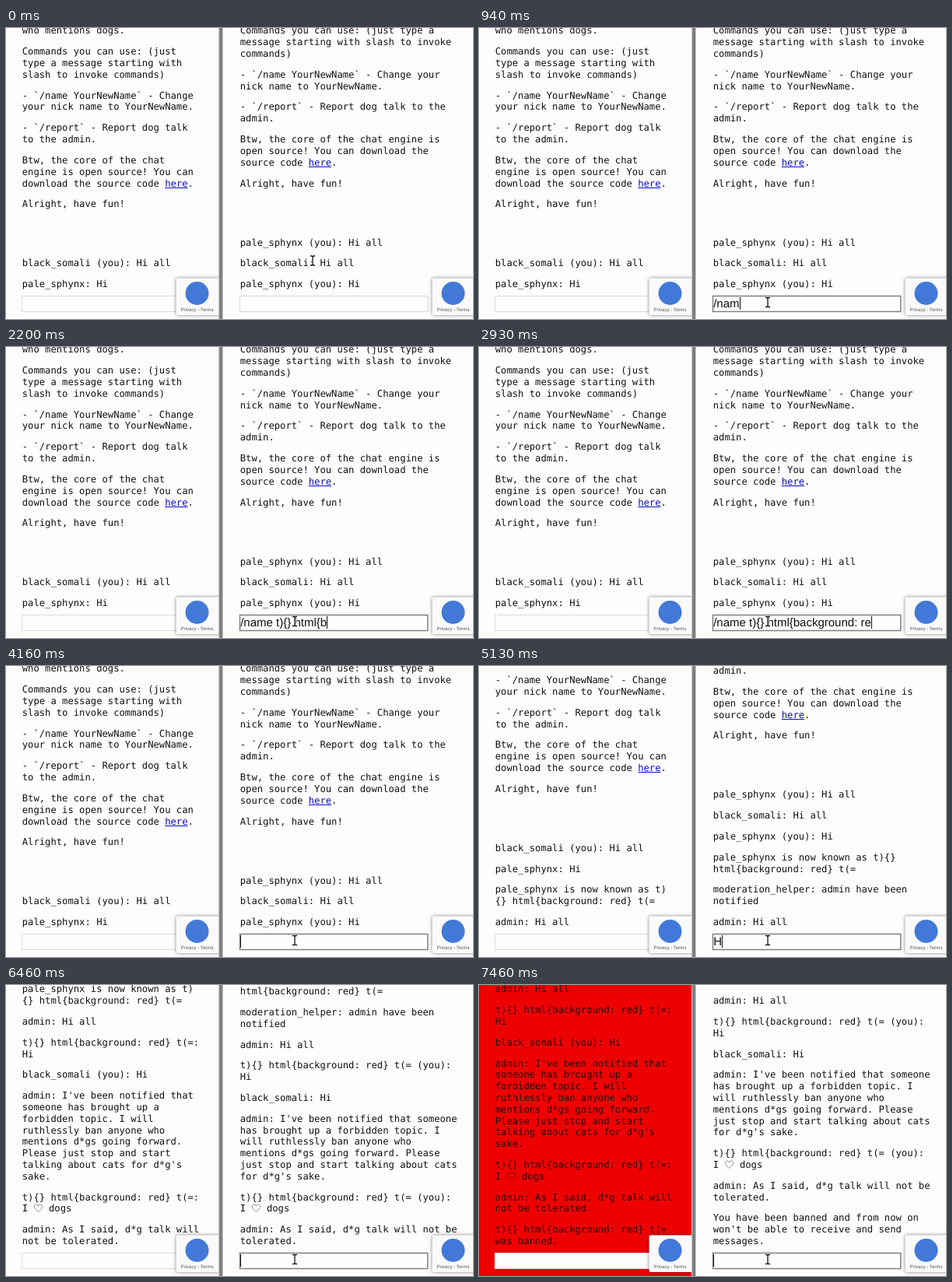
Recreate the animation shown at these times as an HTML page with a canvas. Size 600 by 374 pixels, loop 7.52 s.

```html
<!DOCTYPE html>
<html lang="en">
<head>
<meta charset="utf-8">
<title>Cat chat</title>
<style>
  html, body { margin: 0; width: 100%; height: 100%; overflow: hidden; background: #fdfdfd; }
  canvas { display: block; width: 600px; height: 374px; }
</style>
</head>
<body>
<canvas id="stage"></canvas>
<script>
const LOOP = 7520, W = 600, H = 374;
const LINE = 14.81, GAP = 11.99, LAST_BASELINE = 333.6;
const MONO = '12.19px "DejaVu Sans Mono", monospace';
const FIELD = '15px "Liberation Sans", Arial, sans-serif';
const RED_AT = 6660;

const canvas = document.getElementById('stage');
const ctx = canvas.getContext('2d');
const ratio = window.devicePixelRatio || 1;
canvas.width = W * ratio;
canvas.height = H * ratio;

// Each message is [time, text]; the wide blank after the intro is [time, height].
const left = [
  [0, 'who mentions dogs.'],
  [0, 'Commands you can use: (just\ntype a message starting with\nslash to invoke commands)'],
  [0, '- `/name YourNewName` - Change\nyour nick name to YourNewName.'],
  [0, '- `/report` - Report dog talk\nto the admin.'],
  [0, 'Btw, the core of the chat\nengine is open source! You can\ndownload the source code here.'],
  [0, 'Alright, have fun!'],
  [0, 49.2],
  [0, 'black_somali (you): Hi all'],
  [0, 'pale_sphynx: Hi'],
  [4290, 'pale_sphynx is now known as t)\n{} html{background: red} t(='],
  [5130, 'admin: Hi all'],
  [5330, 't){} html{background: red} t(=:\nHi'],
  [5530, 'black_somali (you): Hi'],
  [5590, "admin: I've been notified that\nsomeone has brought up a\nforbidden topic. I will\nruthlessly ban anyone who\nmentions d*gs going forward.\nPlease just stop and start\ntalking about cats for d*g's\nsake."],
  [6330, 't){} html{background: red} t(=:\nI ♡ dogs'],
  [6460, 'admin: As I said, d*g talk will\nnot be tolerated.'],
  [6660, 't){} html{background: red} t(=\nwas banned.']
];

const right = [
  [0, 'Commands you can use: (just type a\nmessage starting with slash to invoke\ncommands)'],
  [0, '- `/name YourNewName` - Change your\nnick name to YourNewName.'],
  [0, '- `/report` - Report dog talk to the\nadmin.'],
  [0, 'Btw, the core of the chat engine is\nopen source! You can download the\nsource code here.'],
  [0, 'Alright, have fun!'],
  [0, 49.2],
  [0, 'pale_sphynx (you): Hi all'],
  [0, 'black_somali: Hi all'],
  [0, 'pale_sphynx (you): Hi'],
  [4290, 'pale_sphynx is now known as t){}\nhtml{background: red} t(='],
  [4930, 'moderation_helper: admin have been\nnotified'],
  [5130, 'admin: Hi all'],
  [5330, 't){} html{background: red} t(= (you):\nHi'],
  [5530, 'black_somali: Hi'],
  [5590, "admin: I've been notified that someone\nhas brought up a forbidden topic. I\nwill ruthlessly ban anyone who\nmentions d*gs going forward. Please\njust stop and start talking about cats\nfor d*g's sake."],
  [6330, 't){} html{background: red} t(= (you):\nI ♡ dogs'],
  [6460, 'admin: As I said, d*g talk will not be\ntolerated.'],
  [6660, "You have been banned and from now on\nwon't be able to receive and send\nmessages."]
];

// Bursts of typing: [start, ms per key, keys]; empty keys clear the field.
const keys = [
  [760, 60, '/name '],
  [1260, 88, 't){} '],
  [1900, 60, 'html{backgrou'],
  [2680, 50, 'nd: re'],
  [2990, 60, 'd}'],
  [3250, 60, ' t('],
  [3570, 60, '='],
  [3760, 0, ''],
  [4350, 63, '/report'],
  [4930, 0, ''],
  [5130, 100, 'Hi'],
  [5330, 0, ''],
  [5780, 63, 'I ♡ '],
  [6030, 60, 'dogs'],
  [6330, 0, '']
];

function typedAt(t) {
  let out = '';
  for (const [start, step, text] of keys) {
    if (t < start) break;
    out = text ? out + text.slice(0, Math.floor((t - start) / step) + 1) : '';
  }
  return out;
}

function setFont(font) {
  ctx.font = font;
  ctx.textRendering = 'geometricPrecision';
}

function heart(x, y, em) {
  ctx.save();
  ctx.translate(x + em / 2, y - em * 0.36);
  ctx.scale(em, em);
  ctx.beginPath();
  for (const s of [-1, 1]) {
    ctx.moveTo(0, 0.4);
    ctx.bezierCurveTo(s * 0.12, 0.25, s * 0.43, 0.1, s * 0.43, -0.14);
    ctx.bezierCurveTo(s * 0.43, -0.43, s * 0.1, -0.46, 0, -0.21);
  }
  ctx.lineWidth = 0.055;
  ctx.strokeStyle = 'rgba(0,0,0,.6)';
  ctx.stroke();
  ctx.restore();
}

// Draws one line and returns the x where it ends.
function write(text, x, y, font, color) {
  setFont(font);
  const em = parseFloat(font);
  for (const run of text.split(/(here|♡)/)) {
    if (run === '♡') {
      heart(x, y, em);
      x += em;
      continue;
    }
    const w = ctx.measureText(run).width;
    ctx.fillStyle = run === 'here' ? '#0a0ac8' : color;
    ctx.fillText(run, x, y);
    if (run === 'here') ctx.fillRect(x, y + 1, w, 1);
    x += w;
  }
  return x;
}

// Stacks the messages upwards, with baselines on whole pixels.
function messages(list, x, t, color) {
  let y = LAST_BASELINE;
  for (const [time, body] of list.filter(m => m[0] <= t).reverse()) {
    if (typeof body === 'number') {
      y -= body;
      continue;
    }
    for (const line of body.split('\n').reverse()) {
      if (y > -6) write(line, x, Math.floor(y), MONO, color);
      y -= LINE;
    }
    y -= GAP;
  }
}

function field(x, border, weight) {
  ctx.fillStyle = '#fefefe';
  ctx.fillRect(x, 344, 242, 20.5);
  ctx.strokeStyle = border;
  ctx.lineWidth = weight;
  ctx.strokeRect(x + 0.5, 344.5, 241.3, 20);
}

function badge(x) {
  ctx.save();
  ctx.shadowColor = 'rgba(0,0,0,.5)';
  ctx.shadowBlur = 4 * ratio;
  ctx.fillStyle = '#fafafa';
  ctx.beginPath();
  ctx.roundRect(x, 321.5, 62, 47.5, 2);
  ctx.fill();
  ctx.restore();
  ctx.fillStyle = '#4279d8';
  ctx.beginPath();
  ctx.arc(x + 27, 341, 15, 0, Math.PI * 2);
  ctx.fill();
  ctx.textAlign = 'center';
  setFont('6.1px "Liberation Sans", Arial, sans-serif');
  ctx.fillStyle = '#555';
  ctx.fillText('Privacy - Terms', x + 27, 364);
  ctx.textAlign = 'left';
}

function pointer(x, y) {
  ctx.beginPath();
  for (const s of [-1, 1]) {
    ctx.moveTo(x - 3, y + s * 6);
    ctx.lineTo(x - 1, y + s * 6);
    ctx.lineTo(x, y + s * 5);
    ctx.lineTo(x + 1, y + s * 6);
    ctx.lineTo(x + 3, y + s * 6);
  }
  ctx.moveTo(x, y - 5);
  ctx.lineTo(x, y + 5);
  for (const [width, color] of [[3, '#fff'], [1.3, '#111']]) {
    ctx.lineWidth = width;
    ctx.strokeStyle = color;
    ctx.stroke();
  }
}

function clipTo(x, w, paint) {
  ctx.save();
  ctx.beginPath();
  ctx.rect(x, 0, w, H);
  ctx.clip();
  paint();
  ctx.restore();
}

function leftPane(t) {
  const red = t >= RED_AT;
  ctx.fillStyle = red ? '#ee0000' : '#fdfdfd';
  ctx.fillRect(0, 0, 273, H);
  messages(left, 20.75, t, red ? '#240000' : '#111');
  field(20, red ? '#e4d4d0' : '#dcdcd6', 1);
  badge(218.5);
}

function rightPane(t) {
  const focused = t >= 360;
  messages(right, 300.7, t, '#111');
  field(300, focused ? '#808080' : '#d8d8d0', focused ? 1.5 : 1);
  clipTo(301, 240, () => {
    const end = write(typedAt(t), 301.2, 359, FIELD, '#111');
    if (focused) {
      ctx.fillStyle = '#111';
      ctx.fillRect(Math.min(Math.round(end), 540), 346, 1, 16);
    }
  });
  badge(547.5);
}

function divider() {
  const stripes = [[273, 6, '#c4c4c4'], [274, 4, '#888'], [275, 2, '#7c7c7c']];
  for (const [x, w, color] of stripes) {
    ctx.fillStyle = color;
    ctx.fillRect(x, 0, w, H);
  }
}

function draw(t) {
  ctx.setTransform(ratio, 0, 0, ratio, 0, 0);
  ctx.fillStyle = '#fdfdfd';
  ctx.fillRect(0, 0, W, H);
  clipTo(0, 273, () => leftPane(t));
  clipTo(279, 321, () => rightPane(t));
  divider();
  const p = Math.min(6, Math.floor(t / 60)) / 6;
  const ease = p * p * (3 - 2 * p);
  pointer(394 - 23 * ease, 299 + 53.5 * ease);
}

const began = performance.now();
function tick() {
  draw((performance.now() - began) % LOOP);
  requestAnimationFrame(tick);
}
tick();
</script>
</body>
</html>
```
